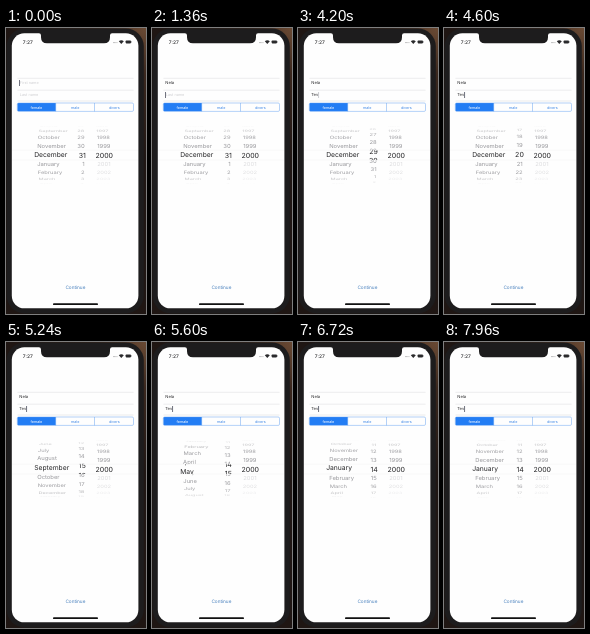
Write an HTML page that moves like this. It is 140 px wide and 286 px high and loops after 8000 ms.

```html
<!DOCTYPE html>
<html lang="en">
<head>
<meta charset="utf-8">
<title>Profile form</title>
<style>
  html, body { margin: 0; width: 100%; height: 100%; overflow: hidden; background: #1c1411; }
  svg { display: block; width: 100vw; height: 100vh; }
  text { font-family: Inter, "Liberation Sans", sans-serif; text-rendering: geometricPrecision; white-space: pre; }
  .field { font-size: 4.1px; fill: #2c2c2e; }
  .hint { font-size: 3.8px; fill: #d0d0d3; }
  .seg { font-size: 3.7px; fill: #4189e6; text-anchor: middle; }
  .rule { stroke: #d8d8da; stroke-width: .5; }
</style>
</head>
<body>
<svg viewBox="0 0 140 286" preserveAspectRatio="none">
  <defs>
    <radialGradient id="room" gradientUnits="userSpaceOnUse" cx="140" cy="0" r="130">
      <stop offset="0" stop-color="#6a4a34"/>
      <stop offset=".35" stop-color="#3a271d"/>
      <stop offset="1" stop-color="#1f1613"/>
    </radialGradient>
    <clipPath id="band"><rect x="6" y="122.2" width="126" height="9.8"/></clipPath>
    <clipPath id="pill"><rect x="11.3" y="75" width="116.2" height="8.4" rx="1.3"/></clipPath>
  </defs>
  <rect width="140" height="286" fill="url(#room)"/>
  <rect x=".6" y=".4" width="137.2" height="285" rx="18" fill="#1d1c1d"/>
  <rect x="5.8" y="5.3" width="126.6" height="275" rx="12.5" fill="#fefefe"/>
  <path d="M33 5h73q-2 .4-2 2.600v1.600q0 6-6 6H41q-6 0-6-6V7.600q0-2.200-2-2.600z" fill="#1d1c1d"/>

  <text x="16.8" y="15.8" font-size="4.9" font-weight="500" fill="#2a2a2c">7:27</text>
  <g fill="#2a2a2c">
    <path d="M107 14.600h4.400" stroke="#2a2a2c" stroke-width=".9" stroke-dasharray=".8 .4" opacity=".4"/>
    <path d="M112.800 13.200q2.500-2 5 0l-2.500 2.700z"/>
    <rect x="119.6" y="12.5" width="5.4" height="2.9" rx=".8"/>
    <rect x="125.4" y="13.4" width=".5" height="1.1"/>
  </g>

  <path class="rule" d="M11.500 50.300H127.500M11.500 62.200H127.500M11.500 73H127.500"/>
  <text id="hint1" class="hint" x="13.8" y="56.4">First name</text>
  <text id="hint2" class="hint" x="13.8" y="68.4">Last name</text>
  <text id="first" class="field" x="13.3" y="56.4"></text>
  <text id="last" class="field" x="13.3" y="68.4"></text>
  <rect id="caret" width=".7" height="6" fill="#35394a"/>

  <rect x="11.3" y="75" width="38.4" height="8.4" fill="#237df4" clip-path="url(#pill)"/>
  <g fill="none" stroke="#5a9af0" stroke-width=".45">
    <rect x="11.3" y="75" width="116.2" height="8.4" rx="1.3"/>
    <path d="M49.700 75v8.400M88.500 75v8.400"/>
  </g>
  <text class="seg" x="30.4" y="80.5" style="fill:#fff">female</text>
  <text class="seg" x="69.2" y="80.5">male</text>
  <text class="seg" x="108.3" y="80.5">divers</text>

  <g id="rows"></g>
  <rect x="6" y="122.2" width="126" height="9.8" fill="#fefefe"/>
  <path d="M6 122.200H132M6 132H132" stroke="#ececee" stroke-width=".4"/>
  <g id="picked" clip-path="url(#band)"></g>

  <text x="69.4" y="260.5" font-size="4.7" fill="#467fbd" text-anchor="middle">Continue</text>
  <rect x="47" y="275.3" width="45" height="1.7" rx=".85" fill="#111"/>
</svg>
<script>
const LOOP = 8000;
const $ = id => document.getElementById(id);
const clamp = v => Math.max(0, Math.min(1, v));
const mod = (v, n) => ((v % n) + n) % n;

const MONTHS = ["January", "February", "March", "April", "May", "June", "July",
  "August", "September", "October", "November", "December"];

// Drag, then a decaying flick: rows left to travel at time t.
function flick(t, { start, release, total, tau, rest, end }) {
  if (t <= start) return total;
  const decay = s => Math.max(0, rest * (Math.exp((end - s) / tau) - 1));
  if (t >= release) return decay(t);
  return total + (decay(release) - total) * (t - start) / (release - start);
}
const dayFlick = { start: 4160, release: 4270, total: 17, tau: 460, rest: .2, end: 6187 };
const monthFlick = { start: 5060, release: 5140, total: 11, tau: 485, rest: .3, end: 6860 };

const wheels = [
  { x: 31, bigX: 28.2, size: 5.9, big: 6.75, anchor: "start",
    label: i => MONTHS[mod(i, 12)], pos: t => flick(t, monthFlick) },
  { x: 78.8, bigX: 79.8, size: 6, big: 7, anchor: "end",
    label: i => String(mod(i - 1, 31) + 1), pos: t => 14 + flick(t, dayFlick) },
  { x: 91.3, bigX: 89.5, size: 5.9, big: 7, anchor: "start",
    label: String, pos: () => 2000, max: 2000 }
];

function addText(parent, size, anchor) {
  const el = document.createElementNS("http://www.w3.org/2000/svg", "text");
  el.setAttribute("font-size", size);
  el.setAttribute("y", size * .36);
  el.setAttribute("text-anchor", anchor);
  return parent.appendChild(el);
}
for (const w of wheels) {
  w.rows = Array.from({ length: 9 }, () => addText($("rows"), w.size, w.anchor));
  w.picks = Array.from({ length: 3 }, () => addText($("picked"), w.big, w.anchor));
}

const MID = 127, RADIUS = 29, STEP = .33, AXIS = 67;

function drawWheel(w, t) {
  const pos = w.pos(t), near = Math.round(pos);
  w.rows.forEach((el, k) => {
    const i = near + k - 4, a = (i - pos) * STEP, c = Math.cos(a);
    const p = 1 - .1 * (1 - c);
    const x = AXIS + (w.x - AXIS) * p;
    el.textContent = w.label(i);
    el.setAttribute("transform",
      `translate(${x} ${MID + RADIUS * Math.sin(a)}) scale(${p} ${Math.max(.01, p * c)})`);
    el.setAttribute("fill", i > w.max ? "#dcdcde" : "#98989c");
    el.setAttribute("opacity", clamp((c - .2) * 1.6));
  });
  w.picks.forEach((el, k) => {
    const i = near + k - 1;
    el.textContent = w.label(i);
    el.setAttribute("transform", `translate(${w.bigX} ${MID + (i - pos) * 9.7})`);
    el.setAttribute("fill", i > w.max ? "#dcdcde" : "#262628");
  });
}

const FIRST = "Nela", LAST = "Tev";
const FIRST_KEYS = [680, 800, 960, 1120], LAST_KEYS = [1840, 2200, 2320];
const FOCUS = 1360;
const typed = (word, keys, t) => word.slice(0, keys.filter(k => t >= k).length);

// Caret fades: [out from, out to, in from, in to]
const BLINKS = [[160, 320, 600, 680], [2760, 2920, 3240, 3320],
  [3680, 3840, 4180, 4240], [6780, 6920, 7240, 7320]];
const caretAlpha = t => BLINKS.reduce((a, [o0, o1, i0, i1]) =>
  t < o0 || t > i1 ? a : Math.max(1 - clamp((t - o0) / (o1 - o0)), clamp((t - i0) / (i1 - i0))), 1);

function setField(id, hint, text) {
  $(id).textContent = text;
  $(hint).setAttribute("visibility", text ? "hidden" : "visible");
}

function draw(t) {
  setField("first", "hint1", typed(FIRST, FIRST_KEYS, t));
  setField("last", "hint2", typed(LAST, LAST_KEYS, t));
  const inLast = t >= FOCUS;
  const active = $(inLast ? "last" : "first");
  const width = active.textContent ? active.getComputedTextLength() + .3 : 0;
  $("caret").setAttribute("x", 13.1 + width);
  $("caret").setAttribute("y", inLast ? 64 : 52);
  $("caret").setAttribute("opacity", caretAlpha(t));
  wheels.forEach(w => drawWheel(w, t));
}

const began = performance.now();
function tick() {
  draw((performance.now() - began) % LOOP);
  requestAnimationFrame(tick);
}
tick();
</script>
</body>
</html>
```
